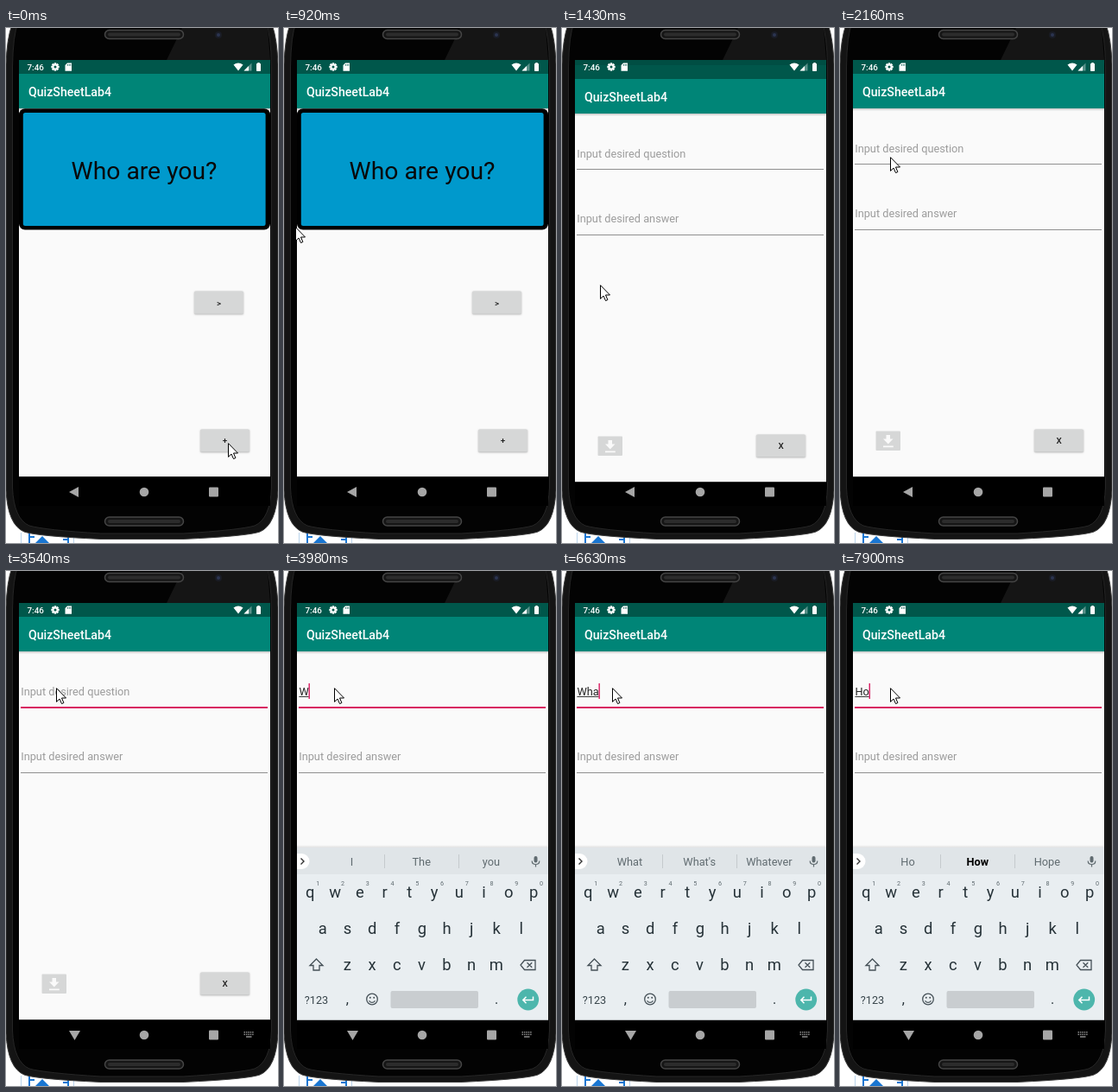
An HTML page with a canvas for the animation above (8 s loop, 315x596 px).

```html
<!DOCTYPE html>
<html lang="en">
<head>
<meta charset="utf-8">
<title>Flash card demo</title>
<style>
html, body { margin: 0; width: 100%; height: 100%; overflow: hidden; background: #fff; }
canvas { display: block; width: 315px; height: 596px; }
</style>
</head>
<body>
<canvas id="stage"></canvas>
<script>
const W = 315, H = 596, LOOP = 8000;
const canvas = document.getElementById('stage');
const dpr = window.devicePixelRatio || 1;
canvas.width = W * dpr;
canvas.height = H * dpr;
const c = canvas.getContext('2d');
const FONT = 'Roboto, "Noto Sans", sans-serif';
const PINK = '#d81b60', PAGE = '#fafafa', INK = '#263238', SOFT = '#606b70';
const FIELD = 12.75, BOTTOM = 519.2;

// Latest entry of [time, ...values] that has started
const at = (list, t) => list.reduce((a, b) => (t >= b[0] ? b : a), list[0]);

function rect(x, y, w, h, color) {
  c.fillStyle = color;
  c.fillRect(x, y, w, h);
}
function round(x, y, w, h, r, fill, stroke, lw = 1) {
  c.beginPath();
  c.roundRect(x, y, w, h, r);
  paint(fill, stroke, lw);
}
function paint(fill, stroke, lw = 1) {
  if (fill) { c.fillStyle = fill; c.fill(); }
  if (stroke) { c.strokeStyle = stroke; c.lineWidth = lw; c.stroke(); }
}
function shape(d, fill, stroke, lw = 1, x = 0, y = 0) {
  c.save();
  c.translate(x, y);
  const p = new Path2D(d);
  if (fill) { c.fillStyle = fill; c.fill(p); }
  if (stroke) { c.strokeStyle = stroke; c.lineWidth = lw; c.stroke(p); }
  c.restore();
}
function dot(x, y, r, fill, stroke, lw) {
  c.beginPath();
  c.arc(x, y, r, 0, 7);
  paint(fill, stroke, lw);
}
function text(s, x, y, size, color, align = 'left', weight = 400) {
  c.font = `${weight} ${size}px ${FONT}`;
  c.textAlign = align;
  c.fillStyle = color;
  c.fillText(s, x, y);
}

function drawPhone() {
  rect(0, 0, W, H, '#fff');
  // Page strip that peeks out below the device
  rect(17, 584, 1, 12, '#b9d3ec');
  rect(78, 584, 1, 12, '#b9d3ec');
  shape('M27 584V596M27 589H33M72 584V596M66 592H72', null, '#1976d2', 2);
  shape('M42 588L50 596H34Z', '#1976d2');

  shape('M0 42Q1 12 7 -4H308Q314 12 315 42V535Q313 575 294 583Q280 588 205 591.5H110Q35 588 21 583Q2 575 0 535Z',
    '#141414', '#3a3a3a', 1);
  shape('M7.5 45Q8 8 14 -6H301Q307 8 307.5 45V532Q306 568 288 576Q270 581 205 585H110Q45 581 27 576Q9 568 7.5 532Z',
    '#030303', '#262626', 1);
  // Glare across the top right
  shape('M204 0H303L306 37H186Z', '#151515');
  for (const y of [2.5, 566]) {
    round(114.5, y, 91, 10, 5, '#161616', '#454545', 1.5);
    round(118, y + 3, 84, 4, 2, '#2c2c2c');
  }
  dot(246, 8, 4, '#1a1d26');
  dot(246, 8, 2, '#2b3450');
  rect(15, 37, 291, 516, '#000');
}

function drawNav(open) {
  const g = '#a6a6a6';
  shape(open ? 'M73 532H86L79.5 543Z' : 'M73 537L84 531V543Z', g);
  dot(160, 537, 5.3, g);
  round(235, 531.5, 11, 11, 1, g);
  if (!open) return;
  for (let i = 0; i < 10; i++) {
    rect(275.5 + (i % 5) * 2.4, 533 + (i > 4 ? 2.6 : 0), 1.5, 1.5, '#8a8a8a');
  }
  rect(278, 538.3, 6.5, 1.5, '#8a8a8a');
}

function drawStatus() {
  const w = '#fff';
  text('7:46', 24.5, 49, 9.9, w, 'left', 500);
  c.save();
  c.translate(57, 45);
  for (let i = 0; i < 4; i++) {
    rect(-1.2, -4.7, 2.4, 9.4, w);
    c.rotate(Math.PI / 4);
  }
  c.restore();
  dot(57, 45, 3.5, w);
  dot(57, 45, 1.5, '#00574b');
  shape('M71 40.5H76V49.8H68.5V43Z', w);
  for (const x of [71, 72.8, 74.4]) rect(x, 42, 0.8, 1.6, '#00574b');
  shape('M263.5 42.5Q269 38.6 274.5 42.5L269 49.5Z', w);
  shape('M284.5 40.5V49.5H275.5Z', 'rgba(255,255,255,.35)');
  shape('M281 44V49.5H275.5Z', w);
  rect(291.3, 40, 2.4, 1.5, w);
  round(290, 41, 5, 9, 0.7, w);
}

function drawBars() {
  rect(15, 37, 291, BOTTOM - 37, PAGE);
  const g = c.createLinearGradient(0, 93, 0, 96);
  g.addColorStop(0, 'rgba(0,0,0,.22)');
  g.addColorStop(1, 'rgba(0,0,0,0)');
  rect(15, 93, 291, 3, g);
  rect(15, 37, 291, 16, '#00574b');
  rect(15, 53, 291, 40, '#008577');
  text('QuizSheetLab4', 26, 79, 14.15, '#fff', 'left', 500);
}

function button(x, y, label, press = 0) {
  c.save();
  c.shadowColor = `rgba(0,0,0,${0.3 + press * 0.1})`;
  c.shadowBlur = (2 + press * 3) * dpr;
  c.shadowOffsetY = (0.7 + press) * dpr;
  round(x, y, 57, 26.2, 1.5, '#d6d7d7');
  c.restore();
  if (press) {
    c.save();
    c.beginPath();
    c.roundRect(x, y, 57, 26.2, 1.5);
    c.clip();
    dot(x + 31, y + 14, 50 * press, 'rgba(0,0,0,.13)');
    c.restore();
  }
  text(label, x + 28.5, y + 17, 9.9, '#1c1c1c', 'center', 500);
}

function drawCards(t) {
  drawBars();
  round(15, 93.3, 291, 140.2, 7, '#000');
  round(19.8, 98, 280.8, 131, 2.5, '#0099cc');
  text('Who are you?', 160, 174.8, 28.3, '#080808', 'center');
  button(218, 304.6, '>');
  button(225, 464.4, '+', at([[0, 0], [500, 0.3], [630, 1], [920, 0]], t)[1]);
}

function drawForm(t) {
  drawBars();
  const focus = t >= 2710;
  rect(17, 157, 286, focus ? 2 : 1, focus ? PINK : '#8f8f8f');
  rect(17, 233, 286, 1, '#8f8f8f');
  const [, typed, from] = at(TYPING, t);
  if (typed) {
    text(typed, 17.4, 143.7, FIELD, '#252525');
    if (from >= 0) {
      const a = c.measureText(typed.slice(0, from)).width;
      rect(17.4 + a, 145, c.measureText(typed).width - a, 0.9, '#252525');
    }
  } else {
    text('Input desired question', 17.2, 143.7, FIELD, '#9c9c9c');
  }
  const caretOff = (t >= 3540 && t < 3980) || (t >= 5850 && t < 6380);
  if (focus && !caretOff) {
    c.font = `400 ${FIELD}px ${FONT}`;
    rect(17.2 + c.measureText(typed).width, 130, 1.4, 18, PINK);
  }
  text('Input desired answer', 17.2, 219.4, FIELD, '#9c9c9c');

  round(41.5, 466.6, 28.5, 22.4, 1, '#d6d7d7');
  shape('M53.5 471H58V475.5H61.5L55.8 481.5L50 475.5H53.5ZM50 483.5H61.8V485.3H50Z', '#fafafa');
  button(225, 464.4, 'X');
}

// time, text, start of the underlined word (-1 for none)
const TYPING = [
  [0, '', -1], [3980, 'W', 0], [4130, 'Wh', 0], [4550, 'What', 0], [5140, 'What ', -1],
  [5270, 'What i', 5], [6380, 'What ', -1], [6500, 'What', 0], [6630, 'Wha', 0],
  [6750, 'Wh', 0], [6870, 'W', 0], [7030, '', -1], [7470, 'H', 0], [7900, 'Ho', 0]
];
// time, three suggestions, bold middle
const HINTS = [
  [0, 'I The you'], [4550, "What What's Whatever"], [5140, 'I time you'], [5270, 'i is in', 1],
  [6380, 'I time you'], [6500, "What What's Whatever"], [6750, 'Wh What Why', 1],
  [6870, 'W We Was', 1], [7030, 'I The you'], [7600, 'H He Hey', 1], [7900, 'Ho How Hope', 1]
];

function drawKeys(t) {
  const g = c.createLinearGradient(0, 317, 0, 320);
  g.addColorStop(0, 'rgba(0,0,0,0)');
  g.addColorStop(1, 'rgba(0,0,0,.1)');
  rect(15, 317, 291, 3, g);
  rect(15, 320, 291, 199.7, '#e9eef1');
  rect(15, 320, 291, 31, '#e0e5e8');
  round(15, 327, 14.5, 18, [0, 9, 9, 0], '#fff');
  shape('M19.5 332.5L23 336L19.5 339.5', null, '#333', 1.4);
  rect(116, 328, 1, 16, '#c5cacd');
  rect(202, 328, 1, 16, '#c5cacd');
  const [, words, bold] = at(HINTS, t);
  words.split(' ').forEach((s, i) => {
    const strong = bold && i === 1;
    text(s, 78.5 + i * 80.7, 341, 12.75, strong ? '#000' : SOFT, 'center', strong ? 700 : 400);
  });
  round(289.5, 330, 4, 7.5, 2, SOFT);
  shape('M287.2 335.5Q287.2 339.5 291.5 339.5T295.8 335.5M291.5 339.5V342.5', null, SOFT, 1.2);

  const rows = [['qwertyuiop', 30.3, 378], ['asdfghjkl', 44.8, 419.5], ['zxcvbnm', 73.3, 461.5]];
  rows.forEach(([keys, x, y], r) => [...keys].forEach((k, i) => {
    text(k, x + i * 28.75, y, 18.4, INK, 'center');
    if (!r) text((i + 1) % 10, x + i * 28.75 + 9, 364, 7.2, SOFT, 'center');
  }));
  shape('M37.5 449L45 456.5H41V462H34V456.5H30Z', null, '#455057', 1.3);
  shape('M278.5 450.5H291V461.5H278.5L274 456ZM281.5 453.2L287.2 458.8M287.2 453.2L281.5 458.8', null, '#455057', 1.3);
  text('?123', 37.5, 500.5, 12.7, '#37444a', 'center');
  text(',', 73.3, 500.5, 16, INK, 'center');
  text('.', 246, 500.5, 16, INK, 'center');
  dot(102, 495.5, 6.3, null, '#455057', 1.3);
  dot(99.8, 493.8, 1, '#455057');
  dot(104.2, 493.8, 1, '#455057');
  shape('M98.5 497.3Q102 501.5 105.5 497.3', null, '#455057', 1.2);
  round(123.5, 486, 101.5, 20, 2, '#c9cdd0');
  dot(282.7, 496, 12.4, '#4db6ac');
  shape('M288.5 492.5V496.5H277M280.5 492.8L276.8 496.5L280.5 500.2', null, '#fff', 1.5);
}

// time, x, y of the pointer
const POINTER = [
  [0, 257, 480], [920, 13, 230], [1040, 32, 283], [1190, 41, 303], [1310, 43, 307], [1430, 44, 297],
  [1580, 46, 266], [1730, 49, 234], [1880, 57, 158], [2160, 58, 149], [2280, 58, 136], [2430, 58, 135]
];
function drawPointer(t) {
  const [, x, y] = at(POINTER, t);
  shape('M0.5 0.7V16.4L4 13L6.5 18.6L8.9 17.6L6.5 12H11.5Z', '#fff', '#000', 1, x, y);
}

// time, card lift, dimming, form drop, top edge of the revealed form
const OPENING = [
  [0, 0, 0, 0, 0], [1190, 0.3, 0.02, 20, 470], [1310, 1.2, 0.07, 18.3, 232],
  [1430, 4, 0.1, 6, 43], [1580, 0, 0, 1, 37], [1730, 0, 0, 0, 37]
];

function draw(t) {
  c.setTransform(dpr, 0, 0, dpr, 0, 0);
  drawPhone();
  drawNav(t >= 3540);
  const [start, lift, dim, drop, edge] = at(OPENING, t);

  if (start < 1580) {
    c.save();
    c.beginPath();
    c.rect(15, 37, 291, BOTTOM - 37);
    c.clip();
    rect(15, 37, 291, BOTTOM - 37, PAGE);
    c.translate(0, -lift);
    drawCards(t);
    c.restore();
    if (dim) rect(15, 37, 291, BOTTOM - 37, `rgba(0,0,0,${dim})`);
  }
  if (start) {
    c.save();
    c.beginPath();
    c.rect(15, edge, 291, 520 + drop - edge);
    c.clip();
    if (drop < 2) rect(15, 37, 291, 4, '#00574b');
    c.translate(0, drop);
    drawForm(t);
    c.restore();
  }
  drawStatus();
  if (t >= 3830) {
    c.globalAlpha = t < 3980 ? 0.75 : 1;
    drawKeys(t);
    c.globalAlpha = 1;
  }
  drawPointer(t);
}

const begin = performance.now();
function tick() {
  draw((performance.now() - begin) % LOOP);
  requestAnimationFrame(tick);
}
tick();
</script>
</body>
</html>
```
